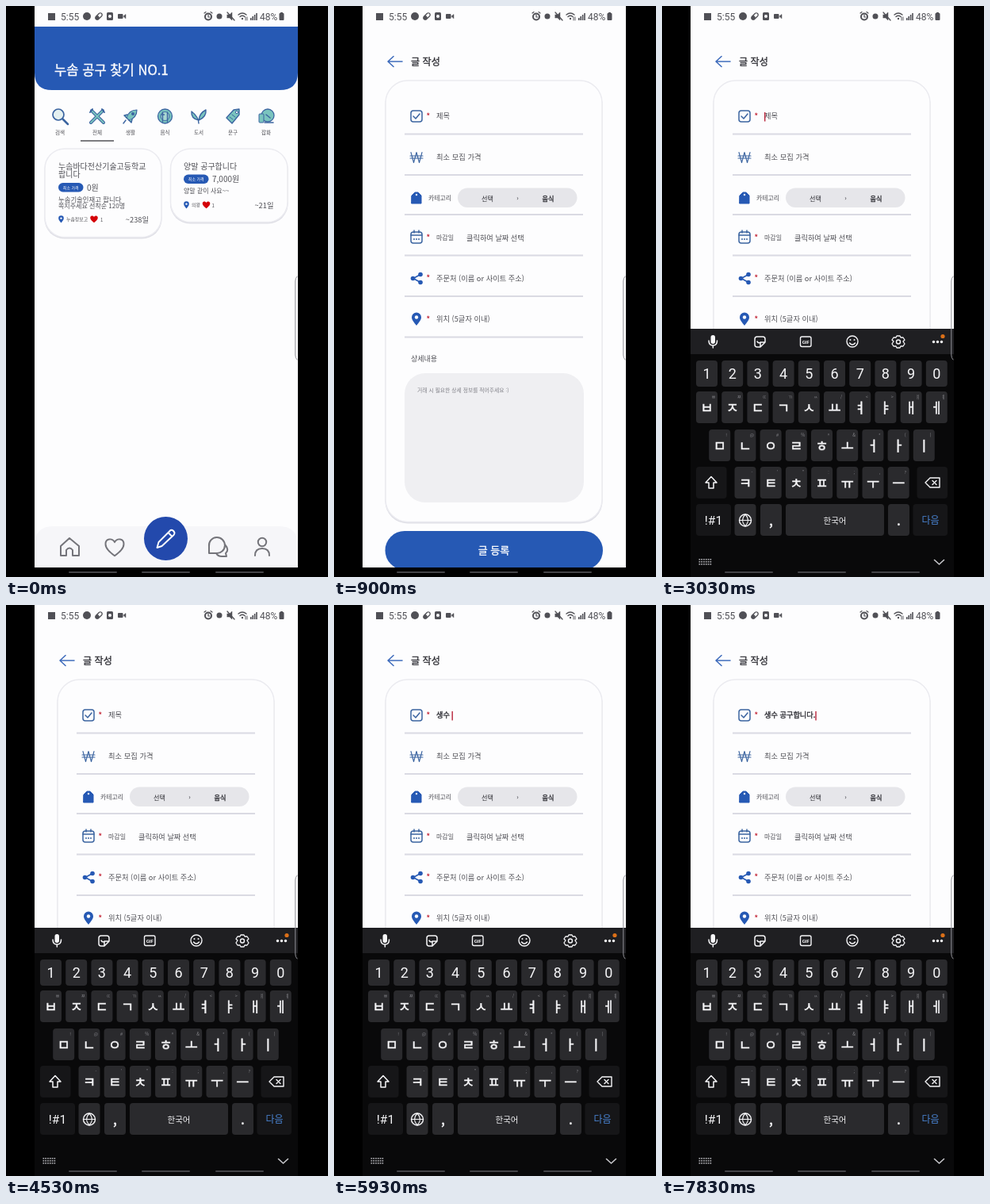
Write an HTML page that moves like this. It is 406 px wide and 720 px high and loops after 8 s.

```html
<!DOCTYPE html>
<html lang="ko">
<head>
<meta charset="utf-8">
<style>
html, body { margin: 0; width: 100%; height: 100%; overflow: hidden; background: #000; }
svg { display: block; width: 406px; height: 720px; }
text { font-family: "Noto Sans CJK KR", "Noto Sans CJK JP", "Noto Sans CJK", sans-serif; white-space: pre; }
.roboto { font-family: Roboto, sans-serif; }
</style>
</head>
<body>
<svg id="stage" viewBox="0 0 406 720"></svg>
<script>
const INK = '#505056', DARK = '#2e2e34', BLUE = '#2659b4', PAPER = '#fdfdfe', PALE = '#efeff2', LINE = '#dadae3',
  TEAL = '#7ac4be', NAVY = '#3b64a0', KEY = '#2a2a2d', KEYDARK = '#161618', KEYINK = '#f6f6f8';

const esc = s => s.replace(/&/g, '&amp;').replace(/</g, '&lt;');
const text = (x, y, size, s, fill = INK, more = '') =>
  `<text x="${x}" y="${y}" font-size="${size}" fill="${fill}" ${more}>${esc(s)}</text>`;
const mid = (x, y, size, s, fill, more = '') => text(x, y, size, s, fill, 'text-anchor="middle" ' + more);
const heavy = (color, w = .4) => `stroke="${color}" stroke-width="${w}"`;
const rect = (x, y, w, h, r, fill, more = '') =>
  `<rect x="${x}" y="${y}" width="${w}" height="${h}" rx="${r}" fill="${fill}" ${more}/>`;
const dot = (x, y, r, fill, more = '') => `<circle cx="${x}" cy="${y}" r="${r}" fill="${fill}" ${more}/>`;
const path = (d, stroke = 'none', w = 1.5, fill = 'none') =>
  `<path d="${d}" stroke="${stroke}" stroke-width="${w}" fill="${fill}" stroke-linecap="round" stroke-linejoin="round"/>`;
const at = (x, y, s) => `<g transform="translate(${x} ${y})">${s}</g>`;
const group = (id, s) => `<g id="${id}">${s}</g>`;

const heart = (x, y, s, stroke, w, fill) => `<g transform="translate(${x} ${y}) scale(${s})">` +
  path('M0 9C-5 5-10 1-10-4C-10-10-3-11 0-6C3-11 10-10 10-4C10 1 5 5 0 9Z', stroke, w, fill) + '</g>';
const pin = (x, y, s) => `<g transform="translate(${x} ${y}) scale(${s})">` +
  path('M0 8C-3 4-6 1-6-2.500A6 6 0 0 1 6-2.500C6 1 3 4 0 8Z', 'none', 0, BLUE) + dot(0, -2.5, 2.2, PAPER) + '</g>';
const card = (x, y, w, h, r) => rect(x, y + 1.5, w, h, r, '#dedee5') +
  rect(x + .5, y, w - 1, h - .5, r, PAPER, 'stroke="#ebebf0" stroke-width="1.5"');

function statusBar() {
  const c = INK;
  return rect(53, 9, 9, 9, 0, c) + text(69, 17.5, 12, '5:55', c, 'class="roboto"') +
    dot(102, 13, 5, c) +
    `<g transform="translate(117 13) rotate(-45)">${rect(-5, -2.3, 10, 4.6, 2.3, 'none', `stroke="${c}" stroke-width="1.3"`)}${rect(-5, -2.3, 5, 4.6, 2, c)}</g>` +
    rect(127, 8, 8, 10, 1.5, c) + dot(131, 13, 2, PAPER) +
    rect(141, 10, 6.5, 6, 1, c) + path('M148 13l3-2.500v5Z', c, .5, c) +
    dot(255, 13.5, 4, 'none', `stroke="${c}" stroke-width="2"`) + path('M255 11v3h2M250 9l2-1.500M260 9l-2-1.500', c, 1.2) +
    dot(269, 13, 3.5, c) +
    path('M279 11h3l3-3v10l-3-3h-3Z', c, .5, c) + path('M279 8l9 10', c, 1.3) +
    path('M293 11q5-4 10 0M295 13.500q3-2.500 6 0', c, 1.4) + dot(298, 16, 1.2, c) + path('M302 14v4M304 14v4', c, .9) +
    [0, 1, 2, 3].map(i => rect(308 + i * 2.4, 15 - i * 2, 1.6, 3 + i * 2, 0, c)).join('') +
    text(320, 17.5, 12, '48%', c, 'class="roboto"') + rect(344.5, 9, 6, 9, 1, c) + rect(346, 8, 3, 2, 0, c);
}

function categories() {
  const icons = [
    dot(-2, -2, 7, '#e4f0f0', `stroke="${NAVY}" stroke-width="1.700"`) + path('M3.500 3.500L10 10', NAVY, 2.5),
    path('M-7-7L8 8M7-7L-8 8', NAVY, 4) + path('M-7-7L8 8M7-7L-8 8', TEAL, 1.8) + path('M-9-5l3-4M9-5l-3-4', NAVY, 2),
    path('M-5 2Q-2-8 8-8Q8 2-2 5Z', NAVY, 1.2, TEAL) + path('M-4-2l-4 1l3 3M2 4l-1 4l-3-3M-6 5l-3 4', NAVY, 1.4, TEAL) + dot(3, -3, 2, NAVY),
    dot(0, 0, 9, TEAL, `stroke="${NAVY}" stroke-width="1.300"`) + dot(0, 0, 5.5, '#a9d8d2', `stroke="${NAVY}"`) + path('M-3-5v12M3-5v12M-4-2h3', NAVY, 1.4),
    path('M0 9Q0 1-9-6Q-10 3 0 5Q1-4 9-8Q10 1 0 5', NAVY, 1.4, TEAL),
    path('M-8 2L1-8L8-9L8-2L-1 9Z', NAVY, 1.4, TEAL) + dot(5, -5, 1.6, PAPER, `stroke="${NAVY}"`) + path('M-4 1l4 3M-1-2l4 3', NAVY, 1),
    dot(2, -1, 8, TEAL, `stroke="${NAVY}" stroke-width="1.300"`) + rect(-9, -3, 6, 11, 1, TEAL, `stroke="${NAVY}"`) + path('M-2 8h11M0-2l5 4', NAVY, 1.5)];
  return ['검색', '전체', '생활', '음식', '도서', '문구', '잡화'].map((name, i) => {
    const x = [68, 115, 157, 200.5, 243, 286, 328][i];
    return at(x, 139, icons[i]) + mid(x, 161.5, 6.6, name);
  }).join('') + rect(94, 169.3, 42, 1.4, 0, '#47474c');
}

function offer(x, y, price, place, days, footY, right) {
  return rect(x, y, 31.5, 11.5, 5.7, BLUE) + mid(x + 15.7, y + 7.7, 5, '최소 가격', '#fff') +
    text(x + 36, y + 9.5, 10, price) + pin(x + 3.5, footY, .55) + text(x + 10, footY + 2.3, 5.9, place) +
    heart(x + (right < 200 ? 45 : 28.500), footY, .48, 'none', 0, '#d40008') +
    text(x + (right < 200 ? 53 : 35.500), footY + 2.5, 6, '1') +
    text(right, footY + 3.5, 9.3, days, INK, 'text-anchor="end"');
}

function home() {
  const nav = '#74747a';
  return rect(36, 0, 332, 708, 0, PAPER) +
    path('M36 26H368V84Q368 106 345 106H58Q36 106 36 84Z', 'none', 0, BLUE) +
    text(61, 87, 16.6, '누솜 공구 찾기 NO.1', '#fcfcfe', heavy('#fcfcfe')) + categories() +
    card(48.5, 180, 148, 112, 25) +
    text(66, 206, 10, '누솜바다전산기술고등학교') + text(66, 216, 10, '팝니다') +
    text(66, 246.5, 8.4, '누솜기술인재고 팝니다') + text(66, 254.5, 8, '쪽지주세요 선착순 120명') +
    offer(66, 223, '0원', '누솜정보고', '~238일', 269, 180) +
    card(207, 180, 148.5, 93, 25) + text(224, 206, 10, '양말 공구합니다') + text(224, 236, 8, '양말 같이 사요~~') +
    offer(224, 212.5, '7,000원', '의왕', '~21일', 251, 337.5) +
    path('M36 708V680Q36 656 60 656H344Q368 656 368 680V708Z', 'none', 0, '#f6f6f9') +
    path('M69 681L80 671L92 681V693H84V686Q80 681 76 686V693H69Z', nav, 2) + heart(137, 683, 1.15, nav, 1.7, 'none') +
    dot(201.5, 671.5, 27.5, '#2349ac') +
    at(201.5, 672, path('M-11 11L-9 4L6-11Q9-12 11-8Q11-6 10-5L-5 9ZM3-8L8-3', '#fff', 1.9)) +
    path('M256 690V681A10 10 0 1 1 265 690ZM276 679Q282 686 277 690L278 694H272Q267 694 265 690', nav, 2) +
    dot(323, 676, 5.2, 'none', `stroke="${nav}" stroke-width="2"`) + path('M314 693Q314 684 323 684T332 693', nav, 2);
}

function form() {
  const star = y => text(116.5, y, 9, '*', '#c4283a', 'font-weight="700"');
  const box = rect(97, -7, 14, 14, 3, 'none', `stroke="${NAVY}" stroke-width="1.500"`);
  const row = (y, icon, label, size = 9.25, x = 129) => at(0, y, icon) + text(x, y + 3.4, size, label);
  return rect(36, 0, 332, 708, 0, PAPER) + path('M86 70H68M75 63.500L68 70L75 76.500', '#3f6cbc', 1.6) +
    text(97, 74.5, 12.1, '글 작성', DARK, heavy(DARK, .3)) + card(64.5, 94, 274, 557, 28) +
    [161.5, 213, 263, 314.5, 366, 417.5].map(y => rect(89, y - 1, 225, 2, 0, LINE)).join('') +
    at(0, 139, box + path('M100 0L103 3L108-3', NAVY, 1.5)) + group('hint', text(129, 142.4, 9.25, '제목')) +
    row(190.5, path('M97-6L100.500 7L104-6L107.500 7L111-6M96-1.500H112M96 1.500H112', NAVY, 1.1), '최소 모집 가격', 9.3) +
    row(242, path('M98-3L102-7H106L110-3V7H98Z', BLUE, 1, BLUE) + dot(104, -4, 1.2, PAPER), '카테고리', 7.9, 119) +
    rect(156, 229.5, 150.5, 24.5, 12.2, '#e6e6ea') + mid(193.5, 245.5, 8.1, '선택', DARK) +
    mid(231.5, 245, 8, '›', DARK) + mid(270, 245.5, 8.1, '음식', DARK, heavy(DARK, .3)) +
    row(292, box + path('M97-3H111M101-9V-6M107-9V-6', NAVY, 1.5) + [101, 104, 107].map(x => dot(x, 2, 1, NAVY)).join(''), '마감일', 8) +
    text(167, 295.5, 9.2, '클릭하여 날짜 선택') +
    row(343.5, path('M109-5L100 0L109 5', BLUE, 1.5) + dot(109, -5, 2.8, BLUE) + dot(99.5, 0, 2.8, BLUE) + dot(109, 5, 2.8, BLUE), '주문처 (이름 or 사이트 주소)') +
    row(395, pin(104, 0, 1), '위치 (5글자 이내)') +
    [142, 295, 346, 398].map(star).join('') + text(97, 448, 9, '상세내용') +
    rect(89, 463, 226, 163, 26, PALE) + text(105, 487, 6.8, '거래 시 필요한 상세 정보를 적어주세요 :)', '#818188') +
    rect(64.5, 662, 274.5, 49, 24.5, BLUE) + mid(201.5, 691, 13, '글 등록', '#fff', heavy('#fff', .3)) +
    text(129, 142.4, 9.2, '', DARK, 'id="title" ' + heavy(DARK, .35)) + rect(129, 134, 1.4, 11.5, 0, '#b8243a', 'id="caret"');
}

const keys = {};
function keyRow(chars, x0, y, small, h = 40) {
  return [...chars].map((c, i) => {
    const x = x0 + i * 32.2;
    keys[c] = { x, y, w: 27 };
    return rect(x - 13.5, y, 27, h, 4, KEY) +
      (h < 40 ? mid(x, y + h / 2 + 6.5, 18, c, KEYINK, 'class="roboto"') : mid(x, y + 27.3, 17.5, c, KEYINK, heavy(KEYINK, .5))) +
      (small ? mid(x + 8.5, y + 9, 5.5, small[i], '#85858a') : '');
  }).join('');
}

function keyboard() {
  const dark = (x, w, y) => rect(x, y, w, 40, 4, KEYDARK);
  const line = (d, w = 1.5) => path(d, KEYINK, w);
  const ring = (x, y, r) => dot(x, y, r, 'none', `stroke="${KEYINK}" stroke-width="1.400"`);
  keys[' '] = { x: 218, y: 628, w: 124 };
  return rect(36, 407, 332, 313, 0, '#09090a') + rect(36, 407, 332, 32, 0, '#1f1f22') +
    rect(61.5, 415, 5.5, 11, 2.7, KEYINK) + line('M59 422Q59 428 64.300 428T69.500 422M64.300 428V431') +
    line('M117 420Q117 417 120 417H127Q130 417 130 420V424L124 430H120Q117 430 117 427ZM124 430V424H130M120 423Q122 426 124 424') +
    rect(174.5, 417, 13.5, 12.5, 2, 'none', `stroke="${KEYINK}" stroke-width="1.400"`) + mid(181.2, 425.7, 6, 'GIF', KEYINK, 'class="roboto" font-weight="700"') +
    ring(240, 423, 7) + line('M236.500 425Q240 429 243.500 425') + dot(237.5, 421, 1, KEYINK) + dot(242.5, 421, 1, KEYINK) +
    line('M296 416H300L301 418L304 418L306 421L304 423L306 426L304 429L301 429L300 431H296L295 429L292 429L290 426L292 423L290 421L292 418L295 418Z', 1.3) + ring(298, 423.5, 2.5) +
    [342.5, 347.5, 352.5].map(x => dot(x, 423.5, 1.7, KEYINK)).join('') + dot(354, 416.5, 2.6, '#dc7018') +
    keyRow('1234567890', 56.5, 447, null, 33) +
    keyRow('ㅂㅈㄷㄱㅅㅛㅕㅑㅐㅔ', 56.5, 486, 'ㅃㅉㄸㄲㅆ/<>ㅒㅖ') +
    keyRow('ㅁㄴㅇㄹㅎㅗㅓㅏㅣ', 72.7, 534, '!@#%^&*()') +
    keyRow('ㅋㅌㅊㅍㅠㅜㅡ', 105, 581, '-\'":;,?') +
    dark(43, 38.5, 581) + line('M62 593.500L69 601H65V608H59V601H55Z') +
    dark(321.5, 38.5, 581) + line('M332 601L338 595H350V607H338ZM341 598.500L346 603.500M346 598.500L341 603.500', 1.4) +
    dark(43, 44, 628) + mid(65, 654, 15.5, '!#1', KEYINK, 'class="roboto"') +
    rect(91.5, 628, 27, 40, 4, KEY) + ring(105, 648.5, 7.5) +
    line('M97.500 648.500H112.500M105 641Q98 648.500 105 656Q112 648.500 105 641', 1.2) +
    keyRow(',', 137.5, 628) + rect(156, 628, 124, 40, 4, KEY) + mid(218, 652.5, 10.5, '한국어', KEYINK) +
    keyRow('.', 298.5, 628) + dark(316.5, 43.5, 628) + mid(338.5, 653, 12, '다음', '#4a86d6') +
    [0, 1, 2].map(r => [0, 1, 2, 3, 4, 5].map(i => rect(46.5 + i * 2.8, 697 + r * 3, 1.7, 1.7, 0, '#a4a4a8')).join('')).join('') +
    path('M343.500 698.500L349.500 704L355.500 698.500', '#c8c8cc', 1.6);
}

const $ = id => document.getElementById(id);
$('stage').innerHTML = '<clipPath id="screen"><rect x="36" width="332" height="720"/></clipPath><g clip-path="url(#screen)">' +
  rect(36, 0, 332, 708, 0, PAPER) + group('home', home()) + group('form', form()) +
  rect(36, 708, 332, 12, 0, '#000') + group('keyboard', keyboard() + group('press', '')) + '</g>' + statusBar() +
  [79, 171, 264].map(x => rect(x, 713, 61, 2, 1, '#444448')).join('') +
  path('M367 341Q364.800 343 364.800 347V440Q364.800 444 367 446', '#909096', 1) + group('touches', '');

// time of press, key, title after release, offset of the finger from the key's centre
const strokes = [
  [4930, 'ㅅ', 'ㅅ'], [5080, 'ㅐ', '새'], [5230, 'ㅇ', '생'], [5360, 'ㅅ', '생ㅅ'], [5490, 'ㅜ', '생수'], [5630, ' ', '생수 '],
  [6170, 'ㄱ', '생수 ㄱ'], [6280, 'ㅗ', '생수 고'], [6390, 'ㅇ', '생수 공'], [6490, 'ㄱ', '생수 공ㄱ', -2, 14],
  [6580, 'ㅜ', '생수 공구', 0, 2], [6700, 'ㅎ', '생수 공궇', -12, -4], [6830, 'ㅏ', '생수 공구하'], [6950, 'ㅂ', '생수 공구합'],
  [7070, 'ㄴ', '생수 공구합ㄴ'], [7190, 'ㅣ', '생수 공구합니'], [7310, 'ㄷ', '생수 공구합닏'], [7420, 'ㅏ', '생수 공구합니다'],
  [7530, '.', '생수 공구합니다.', 11, 0]];
const HOLD = 90, FADE = 210;
const taps = [[50, 203, 674], [950, 165, 141], ...strokes.map(([t, c, , dx = -2, dy = 3]) => [t, keys[c].x + dx, keys[c].y + 20 + dy])];

const ease = (t, from, to) => 1 - (1 - Math.min(1, Math.max(0, (t - from) / (to - from)))) ** 3;

function popup(c) {
  const { x, y, w } = keys[c];
  const glow = rect(x - w / 2, y, w, 40, 4, '#fff', 'opacity=".07"');
  if (c === ' ') return glow;
  const left = Math.min(307, Math.max(37, x - 29.5));
  return glow + rect(left, y - 72, 59, 65, 5, '#1d1d20') + mid(left + 29.5, y - 29.5, 25, c, KEYINK, heavy(KEYINK, .6));
}

function draw() {
  const t = performance.now() % 8000;
  const open = ease(t, 350, 680), up = ease(t, 1120, 1400);
  $('form').setAttribute('opacity', open);
  $('form').setAttribute('transform', `translate(0 ${60 * (1 - open)})`);
  $('keyboard').setAttribute('transform', `translate(0 ${313 * (1 - up)})`);

  const typed = strokes.filter(s => t >= s[0] + HOLD), last = typed[typed.length - 1];
  $('title').textContent = last ? last[2] : '';
  $('hint').setAttribute('opacity', last ? 0 : 1);
  $('caret').setAttribute('x', 129 + (last ? $('title').getComputedTextLength() : 0));
  const beat = Math.floor((t - (last ? last[0] + HOLD : 30)) / 500);
  $('caret').setAttribute('opacity', t > 1060 && beat % 2 === 0 ? 1 : 0);

  const held = strokes.find(s => t >= s[0] && t < s[0] + HOLD);
  $('press').innerHTML = held ? popup(held[1]) : '';
  $('touches').innerHTML = taps.filter(([s]) => t >= s && t < s + HOLD + FADE).map(([s, x, y]) =>
    dot(x, y, 9.3, '#d0d0d2', `stroke="#77777a" opacity="${.85 * Math.min(1, 1 - (t - s - HOLD) / FADE)}"`)).join('');
  requestAnimationFrame(draw);
}
draw();
</script>
</body>
</html>
```
